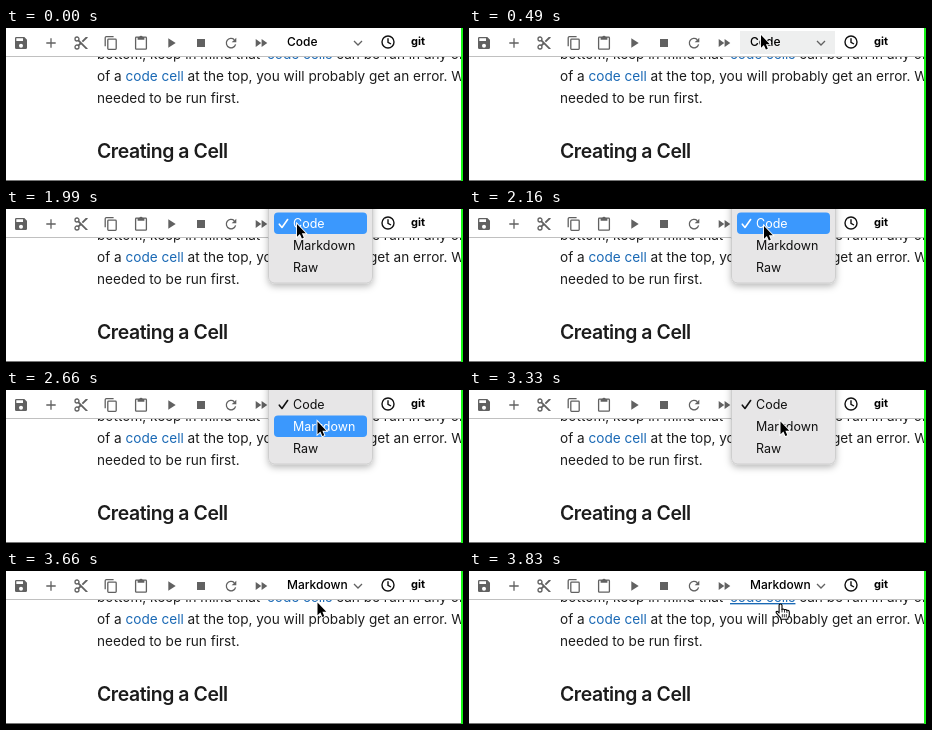
Animation, 457 px wide and 153 px high, one loop 3990 ms. Source, as an HTML page:

```html
<!DOCTYPE html>
<html lang="en">
<head>
<meta charset="utf-8">
<style>
  html, body { margin: 0; height: 100%; overflow: hidden; background: #fff; }
  svg { display: block; width: 100vw; height: 100vh; font-family: Inter, "Open Sans", sans-serif; }
  .body { font-size: 13.6px; fill: #1c1c1c; }
  .body tspan { fill: #1a69b5; }
  .ui { font-size: 12.5px; fill: #111; }
  #selectText { font-size: 12px; font-weight: 500; fill: #000; }
  .line { fill: none; stroke: #616161; stroke-width: 1.3; }
  #link.hover { text-decoration: underline; text-underline-offset: 1px; }
  .item rect { fill: none; }
  .item.on rect { fill: #3b98fd; }
  .item.on text { fill: #fff; }
  .tick { fill: none; stroke: #111; stroke-width: 1.6; stroke-linecap: round; stroke-linejoin: round; }
  .item.on .tick { stroke: #fff; }
</style>
</head>
<body>
<svg viewBox="0 0 457 153">
  <defs>
    <filter id="shadow" x="-20%" y="-20%" width="140%" height="150%">
      <feDropShadow dx="0" dy="3" stdDeviation="3.5" flood-opacity=".28"/>
    </filter>
  </defs>
  <rect width="457" height="153" fill="#fff"/>

  <g class="body">
    <text x="91" y="31">bottom, keep in mind that <tspan id="link" x="261">code cells</tspan> can be run in any order</text>
    <text x="91" y="53">of a <tspan>code cell</tspan> at the top, you will probably get an error. When</text>
    <text x="91" y="75">needed to be run first.</text>
  </g>
  <text x="91" y="130" font-size="19.4" font-weight="600" letter-spacing="-.42" fill="#1c1c1c">Creating a Cell</text>

  <rect width="457" height="28" fill="#fff"/>
  <rect y="28" width="457" height="1" fill="#c0c0c0"/>

  <!-- toolbar icons, each centred on its own origin -->
  <g fill="#616161">
    <path transform="translate(7 7) scale(.667)" fill-rule="evenodd" d="M17 3H5a2 2 0 0 0-2 2v14a2 2 0 0 0 2 2h14a2 2 0 0 0 2-2V7zM12 19a3 3 0 1 1 0-6a3 3 0 0 1 0 6zM15 9H5V5h10z"/>
    <path class="line" d="M40.3 15h9.4M45 10.3v9.4"/>
    <g transform="translate(75 15)">
      <g class="line"><circle cx="-4" cy="-4" r="2"/><circle cx="-4" cy="4" r="2"/></g>
      <path d="M-2.5-3.8L6.7 5.4V6h-2L-3.6-2.3zM-3.6 2.3L-.4-.9L.9.4L-2.3 3.6zM.7-2L4.7-6h2v.7L2-.7z"/>
    </g>
    <g class="line" transform="translate(105 15)">
      <path d="M-5.8 3.3V-5.2Q-5.8-6.4-4.6-6.4H2.6"/>
      <rect x="-3.2" y="-3.8" width="8.4" height="10.2" rx=".8"/>
    </g>
    <g transform="translate(135 15)">
      <rect class="line" x="-5.4" y="-5.8" width="10.8" height="12" rx=".8"/>
      <path d="M-3.4-6H-1.7A1.8 1.8 0 0 1 1.7-6H3.4v2.7H-3.4z"/>
    </g>
    <path d="M162.3 10.3v9.4l7.4-4.7z"/>
    <rect x="191" y="11" width="8" height="8"/>
    <g transform="translate(225 15)">
      <path class="line" d="M3.3-3.3A4.7 4.7 0 1 0 4.6 1.3"/>
      <path d="M5.3-5.3V-.7H.7z"/>
    </g>
    <path d="M249.7 11v8l5.6-4zM255.6 11v8l5.7-4z"/>
  </g>

  <rect id="selectBox" x="271" y="3" width="95" height="23" fill="#eeefef"/>
  <text id="selectText" x="281" y="18"></text>
  <path class="line" d="M348 13l4 4l4-4"/>
  <g fill="none" stroke="#111" stroke-width="1.4">
    <circle cx="382" cy="14" r="6"/>
    <path d="M382 10.2V14.3L385 16"/>
  </g>
  <text x="405" y="17" font-size="11" font-weight="700" fill="#000">git</text>

  <rect y="152" width="457" height="1" fill="#777"/>
  <rect x="455" width="2" height="153" fill="#14f514"/>

  <g id="menu">
    <rect x="262.5" y="-12" width="104" height="86" rx="6" fill="#e7e6e7" stroke="#c4c4c4" stroke-width=".7" filter="url(#shadow)"/>
    <g class="item"><rect x="268" y="3.5" width="93" height="21.5" rx="4"/><path class="tick" d="M273.3 15.2l2.7 3.3l5.6-8"/><text class="ui" x="287" y="19">Code</text></g>
    <g class="item"><rect x="268" y="25.5" width="93" height="21.5" rx="4"/><text class="ui" x="287" y="41">Markdown</text></g>
    <g class="item"><rect x="268" y="47.5" width="93" height="21.5" rx="4"/><text class="ui" x="287" y="63">Raw</text></g>
  </g>

  <path id="arrow" d="M0 0V12.8L2.9 10.1L4.9 14.6L6.8 13.8L4.9 9.3H8.8Z" fill="#000" stroke="#fff" stroke-width="1.8" paint-order="stroke"/>
  <g id="hand" fill="#fff" stroke="#000" stroke-width="1.1" stroke-linejoin="round" stroke-linecap="round">
    <path d="M-1.4 9V1.2Q-1.4 0 0 0T1.5 1.2V5.4Q2.7 4.4 4 5.8Q5.4 5 6.4 6.4Q8.6 5.9 8.8 8V11Q8.6 12.7 7.4 14V15.3H.2V14Q-1.8 12-4.2 8.9Q-4.9 7.3-3.4 7.2Q-2.4 7.5-1.4 9Z"/>
    <path d="M1.5 5.4V8M4 5.8V8.2M6.4 6.4V8.5M1.8 10.5v2.5M3.8 10.5v2.5M5.8 10.5v2.5" stroke-width=".8"/>
  </g>
</svg>

<script>
  const LOOP = 3990;
  const CODE = 0, MARKDOWN = 1, NONE = -1;
  // Each state holds until the next; `item` is the highlighted row of an open menu.
  const states = [
    { at: 0 },
    { at: 490, arrow: [292, 7], hover: true },
    { at: 1660, arrow: [291, 15], hover: true },
    { at: 1990, arrow: [291, 15], hover: true, item: CODE },
    { at: 2160, arrow: [295, 17], hover: true, item: CODE },
    { at: 2460, arrow: [304, 27], hover: true, item: MARKDOWN },
    { at: 2660, arrow: [311.5, 31.5], hover: true, item: MARKDOWN },
    { at: 3330, arrow: [311.5, 31.5], hover: true, item: NONE },
    { at: 3440, arrow: [311.5, 31.5], hover: true, item: MARKDOWN },
    { at: 3660, arrow: [311.5, 31.5], value: "Markdown" },
    { at: 3830, hand: [311.5, 33], value: "Markdown" }
  ];

  const byId = id => document.getElementById(id);
  const items = document.querySelectorAll(".item");
  const show = (id, visible) => byId(id).style.display = visible ? "" : "none";

  function place(id, point) {
    show(id, point);
    if (point) byId(id).setAttribute("transform", `translate(${point})`);
  }

  function render(state) {
    show("selectBox", state.hover);
    show("menu", state.item !== undefined);
    items.forEach((row, i) => row.classList.toggle("on", i === state.item));
    byId("selectText").textContent = state.value || "Code";
    byId("link").classList.toggle("hover", Boolean(state.hand));
    place("arrow", state.arrow);
    place("hand", state.hand);
  }

  const start = performance.now();
  function tick() {
    const time = (performance.now() - start) % LOOP;
    render(states.findLast(state => state.at <= time));
    requestAnimationFrame(tick);
  }
  tick();
</script>
</body>
</html>
```
